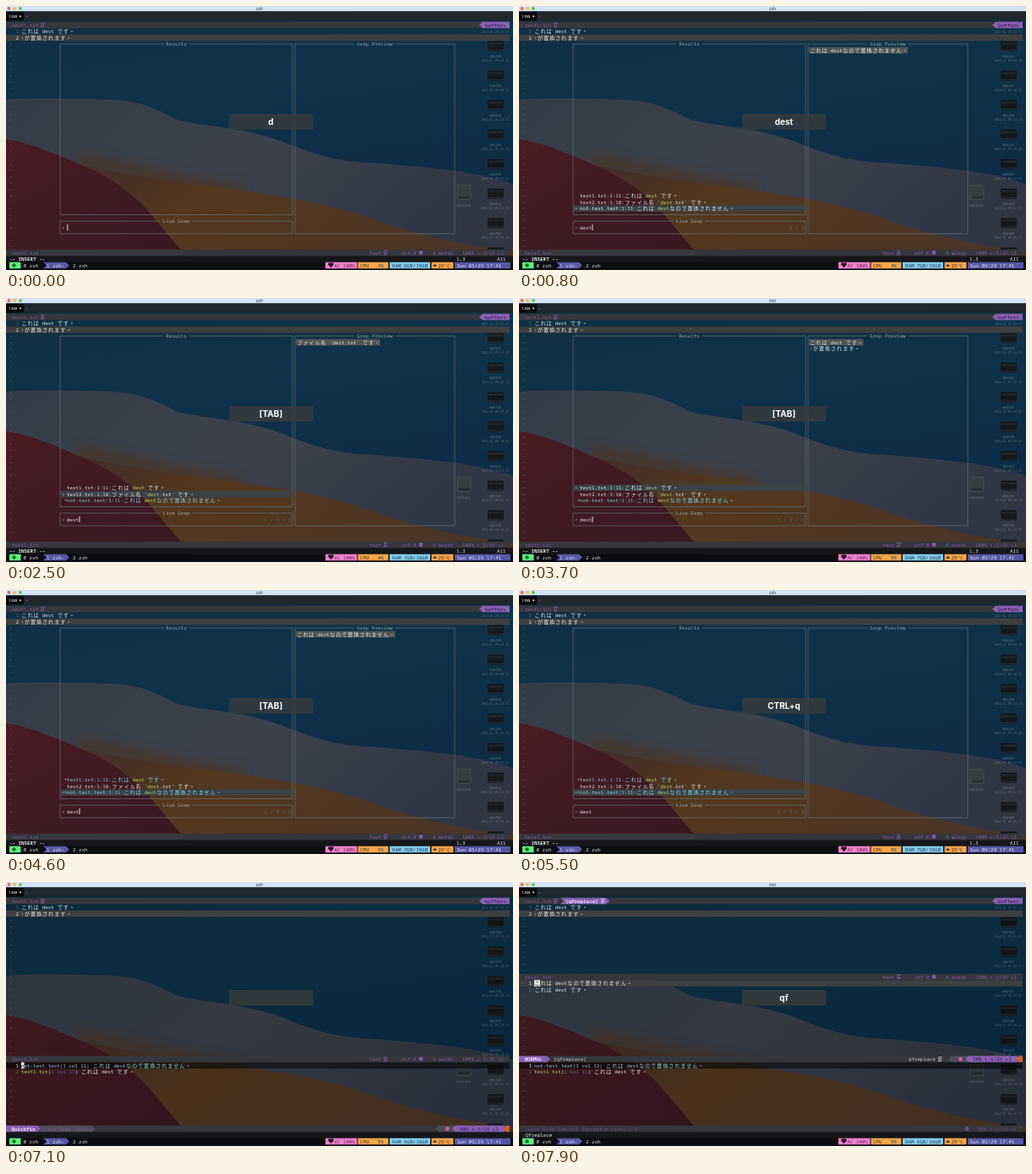
These frames come from a looping animation (600 px wide and 313 px high, 8000 ms). An HTML page:

```html
<!DOCTYPE html>
<html>
<head>
<meta charset="utf-8">
<title>Terminal search and replace</title>
<style>
  html, body { margin: 0; width: 100%; height: 100%; overflow: hidden; background: #0c1a26; }
  svg { display: block; width: 100vw; height: 100vh; }
  text { white-space: pre; font: 500 5.87px "Noto Sans Mono", "DejaVu Sans Mono", monospace; }
  .wide { font: 500 6.2px "Noto Sans CJK TC", "Noto Sans CJK JP", "Noto Sans CJK", sans-serif; letter-spacing: .86px; }
  .key { font: 700 10px Inter, "Open Sans", sans-serif; text-anchor: middle; }
  .tiny { font-size: 3.4px; text-anchor: middle; fill: #8b929a; opacity: .55; }
  .bold { font-weight: 600; }
</style>
</head>
<body>
<svg id="stage" viewBox="0 0 600 313" preserveAspectRatio="none">
  <defs>
    <linearGradient id="sky" x2=".3" y2="1">
      <stop offset="0" stop-color="#102f41"/>
      <stop offset=".4" stop-color="#0e3349"/>
      <stop offset="1" stop-color="#0c2a44"/>
    </linearGradient>
    <linearGradient id="pale" x2="1" y2=".4">
      <stop offset="0" stop-color="#323c48"/>
      <stop offset=".5" stop-color="#3c414c"/>
      <stop offset="1" stop-color="#303645"/>
    </linearGradient>
    <linearGradient id="amber" x2="1" y2=".3">
      <stop offset="0" stop-color="#38272a"/>
      <stop offset=".45" stop-color="#533820"/>
      <stop offset="1" stop-color="#4c3526"/>
    </linearGradient>
    <linearGradient id="red" x2=".8" y2="1">
      <stop offset="0" stop-color="#4a1b23"/>
      <stop offset="1" stop-color="#371822"/>
    </linearGradient>
    <filter id="soft" x="-20%" y="-50%" width="140%" height="200%"><feGaussianBlur stdDeviation="6"/></filter>
  </defs>
</svg>
<script>
const LOOP = 8000, CELL = 3.53, ROW = 7.5;
const CLOSE = 5400, QF = 5600, EDIT = 7700;
const WHITE = '#e4e6e6', DIM = '#5d6670', PURPLE = '#8a56ac', PILL = '#8a5fb2', INK = '#2a1a3a',
      CYAN = '#7fd3dc', LIME = '#b9d66c', BAR = '#35373b', LINE = '#3d3f42';
const svg = document.getElementById('stage');
const timed = [];

const rowY = n => 22.5 + n * ROW;
const rect = (x, y, w, h, fill, more = '') =>
  `<rect x="${x}" y="${y}" width="${w}" height="${h}" fill="${fill}" ${more}/>`;
const path = (d, fill, more = '') => `<path d="${d}" fill="${fill}" ${more}/>`;
const dot = (x, y, r, fill) => `<circle cx="${x}" cy="${y}" r="${r}" fill="${fill}"/>`;
const band = (y, fill, x = 0, w = 596) => rect(x, y - 3.75, w, ROW, fill);
const arrow = (x, y, fill, dir = 1) =>
  path(`M${x} ${y - 3.75}l${4 * dir} 3.75l${-4 * dir} 3.75z`, fill);

// Text on the terminal grid: wide characters take two cells.
function text(x, y, parts, fill = WHITE, cls = '') {
  let out = '';
  for (const [str, color = fill] of typeof parts === 'string' ? [[parts]] : parts) {
    for (const run of str.match(/[\x00-\u2fff]+|[\u3000-\uffff]+/g) || []) {
      const wide = run >= '\u3000';
      out += `<text x="${x + (wide ? .4 : 0)}" y="${y + 2.1}" fill="${color}" class="${wide ? 'wide' : cls}">${run}</text>`;
      x += run.length * CELL * (wide ? 2 : 1);
    }
  }
  return out;
}

function group(markup) {
  const g = document.createElementNS('http://www.w3.org/2000/svg', 'g');
  g.innerHTML = markup;
  svg.append(g);
  return g;
}
const show = (from, to, markup) => timed.push({ from, to, g: group(markup) });

const fileIcon = (x, y, color) =>
  `<path d="M${x} ${y - 2.3}h5M${x} ${y - .6}h3.6M${x} ${y + 1}h5M${x} ${y + 2.6}h3.4" stroke="${color}" stroke-width=".8"/>`;

const tiny = (x, y, s) => `<text class="tiny" x="${x}" y="${y}">${s}</text>`;

function wallpaper() {
  let out = rect(0, 0, 600, 313, 'url(#sky)') +
    path('M0 111C40 108 90 110 125 111C160 113 178 122 203 135C235 143 285 144 330 162C380 182 400 184 433 186C490 190 560 196 600 211V313H0z', 'url(#pale)') +
    path('M85 182C140 192 200 208 280 220', 'none', 'stroke="#4b3527" stroke-width="16" opacity=".8" filter="url(#soft)"') +
    path('M60 182C130 200 230 212 300 222C360 231 400 240 440 255C490 272 540 284 600 290V313H0z', 'url(#amber)') +
    path('M0 158C30 162 60 176 95 191C125 204 150 222 170 245C190 270 205 285 225 313H0z', 'url(#red)');
  for (let i = 0; i < 8; i++) {
    const y = 41.5 + 35 * i;
    out += rect(570, y, 19, 12, '#14171b', 'rx="1"') + rect(571, y + 2, 17, 2, '#25292e') +
      rect(570, y + 10, 19, 1.5, '#22262b');
    if (i < 7) out += tiny(579, y + 19, '画面収録') + tiny(579, y + 24.5, `2022-0… 09.${41 - i}.21`);
  }
  return out + tiny(579, 32, '2022-0… 09.02.17') +
    rect(534, 212.5, 16, 17, '#363c43', 'rx="1.5" stroke="#50565c" stroke-width=".6"') +
    rect(535, 225.5, 14, 3, '#2a2f35') + tiny(541.5, 238, '名称未設定');
}

function titleBar() {
  return rect(0, 0, 600, 6.4, '#d3e3f1') +
    dot(3.5, 3, 1.9, '#f4645c') + dot(10.3, 3, 1.9, '#f5bd4f') + dot(17, 3, 1.9, '#5fc454') +
    '<text x="300" y="4.8" fill="#3b3f45" text-anchor="middle" style="font:5px Inter,sans-serif">zsh</text>' +
    rect(0, 6.4, 600, 11, '#20272c') + rect(0, 7, 21, 10.4, '#07090b') +
    '<text x="3.5" y="13.8" fill="#e8e8e8" style="font:600 4px Inter,sans-serif">1 zsh</text>' +
    dot(17, 12.3, 1, '#e8e8e8') +
    '<text x="23" y="14" fill="#767d84" style="font:4.5px Inter,sans-serif">+</text>';
}

function editor() {
  const y = rowY(0);
  return band(y, BAR) + text(7, y, 'test1.txt', PURPLE) + fileIcon(41, y, PURPLE) +
    rect(564, y - 3.75, 32, ROW, PILL) + arrow(564, y, PILL, -1) + text(567, y, 'buffers', INK) +
    band(rowY(2), LINE) +
    text(11.5, rowY(1), '1', DIM) + text(11.5, rowY(2), '2') +
    text(18, rowY(1), 'これは dest です。') + text(18, rowY(2), '↑が置換されます。', WHITE, 'bold');
}

function tildes(first, last) {
  let out = '';
  for (let n = first; n <= last; n++) out += text(3.5, rowY(n), '~', '#46606e');
  return out;
}

// Status line of the text buffer.
const textStatus = y => band(y, BAR) + text(7, y, 'test1.txt', PURPLE) +
  text(430, y, 'text', PURPLE) + fileIcon(447, y, PURPLE) +
  text(468, y, 'utf-8', PURPLE) + dot(491, y, 2.4, PURPLE) +
  text(505, y, '4 words', PURPLE) + text(540, y, '100% ʟ:2/2≡ ʟ1', PURPLE);

const activeEnd = y => arrow(512, y, '#4b4d54', -1) + rect(512, y - 3.75, 20, ROW, '#4b4d54') +
  dot(522.5, y, 2.4, '#d05fa0') + arrow(532, y, PILL, -1) + rect(532, y - 3.75, 58, ROW, PILL) +
  text(537, y, '50% ʟ:1/2≡ ʟ1', INK) + arrow(592, y, '#c5652d', -1) + rect(591.5, y - 3.75, 4.5, ROW, '#c5652d');

const modeTag = (y, label, w) => rect(0, y - 3.75, w, ROW, PILL) + arrow(w, y, PILL) +
  text(6.5, y, label, '#ece4f4', 'bold');

function frame(x, y, w, h, title) {
  const gap = title.length * CELL / 2 + 3, mid = x + w / 2;
  return path(`M${mid + gap} ${y}H${x + w}V${y + h}H${x}V${y}H${mid - gap}`, 'none',
    'stroke="#6f7a7e" stroke-width=".6" stroke-linejoin="round"') +
    text(mid - gap + 3, y, title, '#98a3a5');
}

function bottomBar() {
  const y = rowY(38), chip = (x, w, fill) => rect(x, y - 3.75, w, ROW, fill);
  return band(rowY(37), '#15161a', 0, 600) + rect(0, 303.5, 600, 9.5, '#0b0d11') +
    chip(4, 13.5, '#5ef07c') + dot(9.5, y, 2.2, '#1c7038') +
    text(20.5, y, '0 zsh') + chip(44, 27, '#5757a8') + arrow(71, y, '#5757a8') + arrow(44, y, '#0b0d11') +
    text(48, y, '1 zsh-') + text(79, y, '2 zsh') +
    chip(378, 37.5, '#f582cf') + path(`M384.5 ${y + 2.8}l-3-3.2a1.6 1.6 0 0 1 3-2a1.6 1.6 0 0 1 3 2z`, '#20131c') +
    text(388.5, y, 'AC 100%', '#6a2456') +
    chip(416.5, 36, '#f7a64c') + text(419, y, 'CPU', '#3a2a16') +
    chip(454, 48, '#82cdf0') + chip(503.5, 26, '#f7a64c') +
    path(`M506 ${y + 1.3}a1 1 0 0 1 .5-1.8a1.2 1.2 0 0 1 2.2 0a1 1 0 0 1 .4 1.8z`, '#3a2a16') +
    text(511.5, y, '25°C', '#3a2a16') +
    chip(531, 66, '#5757a8') + text(533.5, y, 'Sun 05/29 17:41');
}

// Finder list: each entry is [location, before, match, after].
const hits = [
  ['test1.txt:1:11:', 'これは ', 'dest', ' です。'],
  ['test2.txt:1:18:', 'ファイル名 `', 'dest', '.txt` です。'],
  ['not-test.text:1:11:', 'これは ', 'dest', 'なので置換されません。']
];
const cells = s => [...s].reduce((n, c) => n + (c >= '\u3000' ? 2 : 1), 0);

function results(selected, marked, count) {
  return hits.map(([place, before, match, after], i) => {
    const y = rowY(27 + i), on = marked.includes(i), color = on ? CYAN : WHITE;
    return (i === selected ? band(y, '#3b4246', 64.5, 274) + text(66, y, '>', '#b6a4d8') : '') +
      (on ? text(68.7, y, '+', LIME) : '') +
      text(72, y, [[place + before], [match, LIME], [after]], color);
  }).join('') + text(337.5 - count.length * CELL, rowY(32), count, DIM);
}

function preview(i) {
  const line = hits[i].slice(1).join('');
  return band(rowY(4), '#505456', 343, cells(line) * CELL + 1) + text(344, rowY(4), line) +
    (i === 0 ? text(344, rowY(5), '↑が置換されます。', WHITE, 'bold') : '');
}

function quickfix() {
  return band(rowY(26), '#0008') + text(11.5, rowY(26), '1') + text(11.5, rowY(27), '2', DIM) +
    text(18, rowY(26), 'not-test.text|1 col 11| これは destなので置換されません。', CYAN) +
    text(18, rowY(27), [['test1.txt', LIME], ['|'], ['1 col 11', '#71609a'], ['| これは dest です。']]);
}

group(wallpaper());
show(QF, LOOP, rect(0, 0, 600, 313, '#000', 'opacity=".12"'));
group(titleBar() + editor() + bottomBar());

show(0, QF, tildes(3, 35) + textStatus(rowY(36)) +
  text(4, rowY(37), '-- INSERT --', WHITE, 'bold') + text(533, rowY(37), '1,3') + text(581, rowY(37), 'All') +
  frame(64, 45, 275, 202.5, 'Results') + frame(64, 255, 275, 15, 'Live Grep') +
  frame(342, 45, 189, 225, 'Grep Preview') + text(66, rowY(32), '>', '#a58fc8'));

show(300, 2000, results(2, [], '3 / 3'));
show(2000, 3200, results(1, [2], '1 / 3 / 3'));
show(3200, 3800, results(0, [2], '1 / 3 / 3'));
show(3800, QF, results(2, [0, 2], '2 / 3 / 3'));
show(400, 2000, preview(2));
show(2000, 3200, preview(1));
show(3200, 3800, preview(0));
show(3800, CLOSE, preview(2));

// Prompt typing.
for (let n = 0; n <= 4; n++) {
  const from = n * 100, to = n < 4 ? from + 100 : QF;
  show(from, to, text(72, rowY(32), 'dest'.slice(0, n)));
  show(from, Math.min(to, CLOSE), rect(72.4 + n * CELL, rowY(32) - 3.5, .9, 7, '#f0f0f0'));
}

show(QF, EDIT, tildes(3, 24) + textStatus(rowY(25)) + quickfix() + tildes(28, 35) +
  rect(18, rowY(26) - 3.75, CELL, ROW, WHITE) + text(18, rowY(26), 'n', '#22272b') +
  band(rowY(36), BAR) + rect(38, rowY(36) - 3.75, 64, ROW, '#4c4d55') + arrow(102, rowY(36), '#4c4d55') +
  modeTag(rowY(36), 'Quickfix', 37) + text(45, rowY(36), 'Live Grep (dest)', PURPLE) + activeEnd(rowY(36)));

show(EDIT, LOOP, rect(49, 18.75, 54, ROW, PILL) + arrow(49, rowY(0), BAR) + arrow(103, rowY(0), PILL) +
  text(55, rowY(0), '[qfreplace]', '#eee6f6', 'bold') + fileIcon(97, rowY(0), '#ddd0ea') +
  tildes(3, 11) + textStatus(rowY(12)) + band(rowY(13), LINE) +
  text(11.5, rowY(13), '1') + text(11.5, rowY(14), '2', DIM) +
  text(18, rowY(13), 'これは destなので置換されません。') + text(18, rowY(14), 'これは dest です。') +
  rect(18, rowY(13) - 3.75, 2 * CELL, ROW, WHITE) + text(18, rowY(13), 'こ', '#22272b') +
  tildes(15, 24) + band(rowY(25), BAR) + modeTag(rowY(25), 'NORMAL', 33) +
  text(41, rowY(25), '[qfreplace]', '#c8c8cc') + text(461, rowY(25), 'qfreplace', '#c8c8cc') +
  fileIcon(496, rowY(25), '#c8c8cc') + activeEnd(rowY(25)) +
  quickfix() + tildes(28, 35) + band(rowY(36), BAR) +
  text(7, rowY(36), '[Live Grep [dest]] [Quickfix List] [-]', '#6f4d8c') +
  dot(530, rowY(36), 2.4, '#6f4d8c') + text(543, rowY(36), '50% ʟ:1/2≡ ʟ1', '#6f4d8c') +
  text(4, rowY(37), ':Qfreplace'));

// Changing meters.
const meter = (x, s) => text(x, rowY(38), s, '#25364a');
show(0, 3200, meter(440, '4%'));
show(3200, LOOP, meter(440, '5%'));
show(0, 500, meter(457, 'RAM 6GB/16GB'));
show(500, 6500, meter(457, 'RAM 7GB/16GB'));
show(6500, LOOP, meter(457, 'RAM 6GB/16GB'));

// Key display.
group(rect(264, 128, 99.5, 18.5, '#363b3e', 'opacity=".85"'));
const keys = [[0, 'd'], [100, 'de'], [200, 'des'], [300, 'dest'], [1900, '[TAB]'], [3100, ''],
  [3600, '[TAB]'], [4900, ''], [CLOSE, 'CTRL+q'], [6700, ''], [7500, 'q'], [7600, 'qf'], [LOOP]];
keys.slice(0, -1).forEach(([from, label], i) =>
  show(from, keys[i + 1][0], `<text class="key" x="313.5" y="141.3" fill="#fff">${label}</text>`));

function draw(now) {
  const t = now % LOOP;
  for (const { from, to, g } of timed) g.style.display = t >= from && t < to ? '' : 'none';
}
const start = performance.now();
function tick() {
  draw(performance.now() - start);
  requestAnimationFrame(tick);
}
tick();
</script>
</body>
</html>
```
